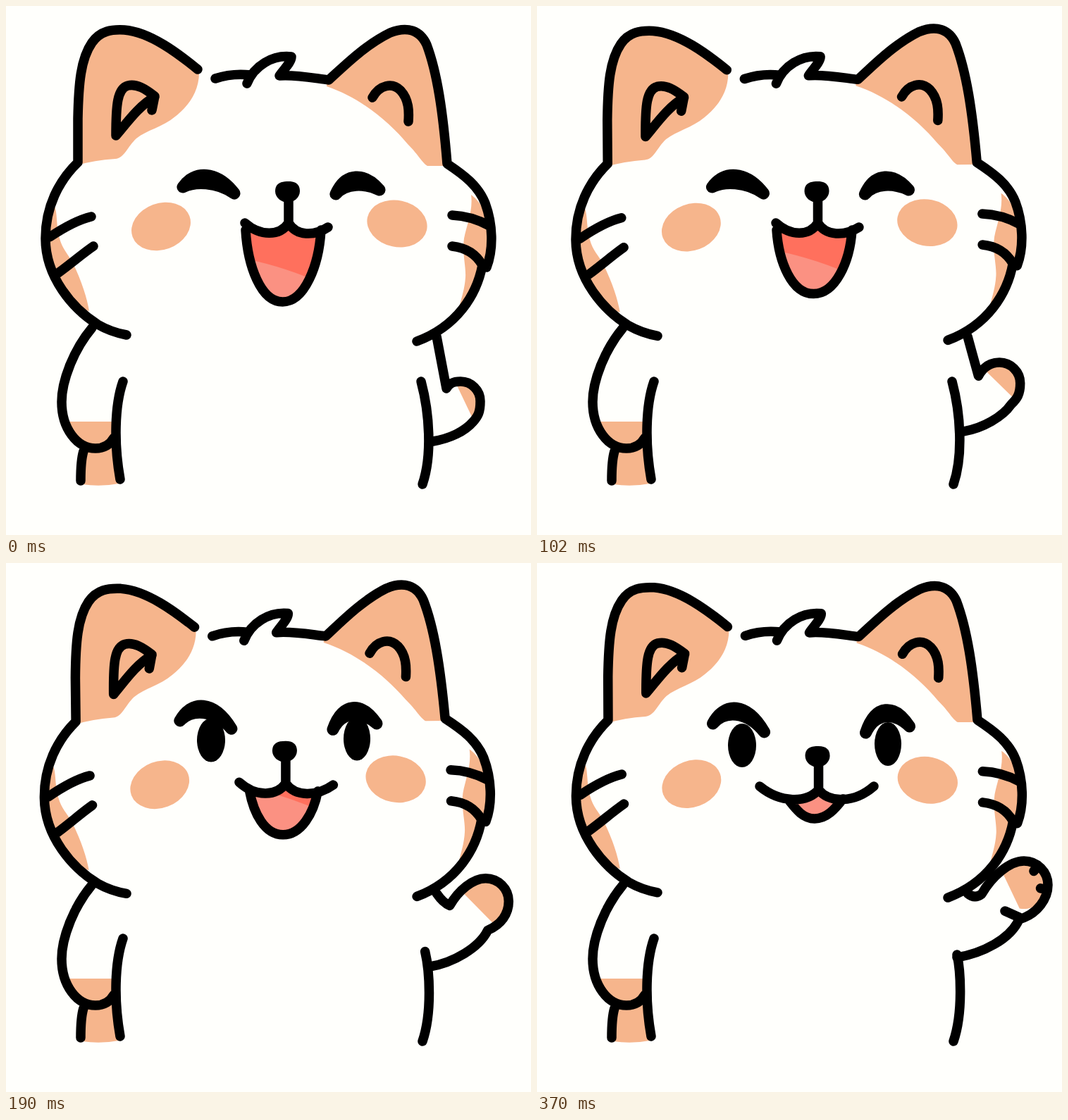
Write an HTML page that moves like this. It is 745 px wide and 751 px high and loops after 430 ms.

```html
<!DOCTYPE html>
<html lang="en">
<head>
<meta charset="utf-8">
<title>Waving cat</title>
<style>
  html, body { margin: 0; width: 100%; height: 100%; overflow: hidden; background: #fffffc; }
  svg { display: block; width: 100%; height: 100%; }
  .line { fill: none; stroke: #000; stroke-width: 13.5; stroke-linecap: round; stroke-linejoin: round; }
  .fur { fill: #f6b58c; }
  .brow { stroke: #000; stroke-width: 17; stroke-linejoin: round; }
</style>
</head>
<body>
<svg viewBox="0 0 745 751">
  <clipPath id="inside"><path id="clip"/></clipPath>

  <!-- body -->
  <path class="fur" d="M90 590H153V612C145 634 102 632 90 590ZM111 632L155 627L160 678Q134 683 108 679Z"/>
  <path class="line" d="M122 457C96 488 79 532 79 562C79 600 101 628 127 628C140 628 148 622 153 613M166 533C154 567 153 622 162 672M110 632C106 645 106 660 106 674"/>
  <path class="line" id="side"/>

  <!-- waving arm -->
  <path class="fur" id="pad"/>
  <path class="line" id="arm"/>

  <!-- head -->
  <g id="head">
    <path class="fur" d="M101 222V160C102 110 104 75 120 52C133 35 150 33 168 34C205 37 245 68 274 92C275 125 254 146 240 157C222 172 200 176 185 188C172 200 168 216 155 217Q125 219 101 226Z"/>
    <path class="fur" d="M455 108C480 85 510 55 545 38C570 28 588 35 597 55C612 95 620 150 626 227L598 227C590 222 586 212 570 196C545 166 505 131 455 114Z"/>
    <path class="fur" d="M69 285C73 292 71 312 76 330C80 345 88 352 95 365C108 392 115 415 118 433C98 428 60 380 57 330ZM660 268C663 290 654 310 650 330C647 350 653 370 652 385C651 402 646 415 643 428C665 405 676 380 678 368L686 330C688 300 674 278 660 268Z"/>
    <ellipse class="fur" rx="43" ry="33" transform="translate(220 313)rotate(-20)"/>
    <ellipse class="fur" rx="43" ry="33" transform="translate(555 309)rotate(12)"/>
    <path class="line" d="M272 90C245 68 205 37 168 34C150 33 134 35 122 52C106 75 103 110 102 160V222C75 248 56 285 56 330C56 385 95 430 130 452Q149 463 171 467"/>
    <path class="line" d="M297 103C312 98 330 96 347 98M342 110C352 85 378 69 405 72C405 80 394 90 388 99C410 97 440 103 458 105C480 85 510 55 545 38C570 28 588 35 597 55C612 95 620 150 626 224C650 240 670 255 680 280C691 310 692 345 682 371"/>
    <path class="line" d="M583 476C640 455 668 410 676 368C667 352 652 343 633 341M633 297Q660 298 686 312M62 328C80 316 100 304 121 299M74 379C92 366 108 352 124 341"/>
    <path class="line" d="M207 148L211 128C198 118 186 110 173 113C158 117 156 140 156 184C170 168 188 142 211 129M520 130C530 112 548 108 560 120C572 133 572 150 571 164"/>
  </g>

  <!-- face -->
  <g id="eyes">
    <ellipse cx="291" rx="20" ry="31"/>
    <ellipse cx="498" cy="-2" rx="19" ry="31"/>
  </g>
  <path class="brow" id="browL"/>
  <path class="brow" id="browR"/>
  <path id="mouth" fill="#ff705d"/>
  <path id="tongue" fill="#fb9182" clip-path="url(#inside)"/>
  <path class="line" id="lips"/>
  <path id="nose" d="M-17 -1C-17 -13 -8 -15 2 -15C13 -15 18 -10 18 -1C18 8 9 15 1 15C-8 15 -17 8 -17 -1Z"/>
</svg>
<script>
const $ = id => document.getElementById(id);
const set = (id, name, value) => $(id).setAttribute(name, value);
const clamp = x => Math.min(1, Math.max(0, x));
const smooth = x => x * x * (3 - 2 * x);
const polar = (x, y, r, a) => `${x + r * Math.cos(a)} ${y + r * Math.sin(a)}`;

function brow(x1, y1, x2, y2, up, low) {
  const a = x1 + (x2 - x1) * .22, b = x1 + (x2 - x1) * .66, y = (y1 + y2) / 2;
  return `M${x1} ${y1}C${a} ${y - up} ${b} ${y - up} ${x2} ${y2}C${b} ${y - low} ${a} ${y - low} ${x1} ${y1}Z`;
}

// open: 0 laughing with shut eyes, 1 brows fully raised
function drawEyes(step, open, sway) {
  const y = 257 - 41 * open + 6 * Math.max(0, step - 4);
  const slope = 9 + 3 * open, up = 28 + 9 * open, low = 13 + 12 * open;
  set('browL', 'd', brow(249 + sway, y, 322 + sway, y + slope, up, low));
  set('browR', 'd', brow(466 + sway, y + slope + 1, 528 + sway, y + 4, up, low));
  set('eyes', 'transform', `translate(0 ${244 + 2.5 * step})`);
  set('eyes', 'visibility', open ? 'visible' : 'hidden');
}

// smile: 0 wide open mouth, 1 small mouth with long lips
function drawMouth(step, smile, sway) {
  const noseX = 397 + sway, noseY = 264 + 11 * smile;
  const cx = noseX + 2, cy = 308 + 14 * smile, dip = 327 + 14 * smile;
  const lx = 339 - 23 * smile, rx = 457 + 21 * smile, lw = cx - lx, rw = rx - cx;
  const jl = 340 + 16 * smile, jr = 447 - 13 * smile, mid = (jl + jr) / 2 - 1;
  const top = 318 + 17 * smile, low = 420 - 57 * clamp(step / 5);
  const bend = (top + low) / 2, edge = 3 + 8 * smile, round = 31 - 14 * smile;
  const lip = `M${lx} ${308 + 9 * smile}C${lx + lw * .35} ${dip} ${cx - lw * .2} ${dip} ${cx} ${cy}` +
    `C${cx + rw * .2} ${dip} ${rx - rw * .35} ${dip} ${rx} ${314 + 3 * smile}`;
  const jaw = `${jr} ${top}C${jr - edge} ${bend} ${mid + round} ${low} ${mid} ${low}` +
    `C${mid - round} ${low} ${jl + edge} ${bend} ${jl} ${top}`;
  const pink = low - 63 - 20 * smile;
  set('nose', 'transform', `translate(${noseX} ${noseY})`);
  set('mouth', 'd', `${lip}L${jaw}Z`);
  set('clip', 'd', `${lip}L${jaw}Z`);
  set('lips', 'd', `${lip}M${cx} ${noseY + 10}V${cy}M${jaw}`);
  set('tongue', 'd', `M330 ${pink}Q395 ${pink + 12} 455 ${pink + 40}V430H330Z`);
}

// raise: 0 paw low at the side, 1 paw up
function drawArm(raise) {
  const r2 = raise * raise;
  const px = 645 + 46 * raise, py = 561 - 104 * raise, R = 28 + 6 * raise, k = R * .55;
  const crookX = 625 + 6 * raise, crookY = 543 - 73 * raise;
  const wristX = px + 18 - 25 * r2, wristY = py + 29 + 20 * r2;
  const rootX = 606 - 10 * raise ** 3, rootY = 618 - 58 * raise;
  let d = `M611 469Q${(611 + crookX) / 2} ${(469 + crookY) / 2 + 8 * r2} ${crookX} ${crookY}` +
    `C${crookX + 3 + 12 * raise} ${crookY - 6 - 20 * raise} ${px - 12 - 8 * raise} ${py - R} ${px} ${py - R}` +
    `C${px + k} ${py - R} ${px + R} ${py - k} ${px + R} ${py}` +
    `C${px + R} ${py + k} ${wristX + 7 + 20 * r2} ${wristY - 8} ${wristX} ${wristY}` +
    `C${wristX - 12} ${wristY + 14 + 14 * raise} ${rootX + 24 + 12 * raise} ${rootY - 4 - 2 * raise} ${rootX} ${rootY}`;
  if (raise > .9) { // toes and wrist crease
    for (const a of [-.95, .2]) d += `M${polar(px, py, R, a)}L${polar(px, py, R - 10, a)}`;
    d += `M${wristX} ${wristY - 3}l-20 -9`;
  }
  set('arm', 'd', d);

  // the coloured tip is a circle segment whose chord turns and slides back
  const facing = (37 + 110 * (raise - .5) ** 2 - 90) * Math.PI / 180;
  const half = Math.acos((5 - 25 * raise) / R);
  set('pad', 'd', `M${polar(px, py, R, facing - half)}A${R} ${R} 0 ${+(half > Math.PI / 2)} 1 ${polar(px, py, R, facing + half)}Z`);
}

function draw(step) {
  const tilt = -.68 * Math.sin(Math.PI * (step / 7) ** .8), sway = 2 + 6 * tilt;
  const open = 1 - (1 - clamp((step - 1) / 3)) ** 1.5;
  set('head', 'transform', `rotate(${tilt} 365 465)`);
  set('side', 'd', `M${589 + 7 * open} ${533 + 23 * open}C601 578 605 638 591 679`);
  drawEyes(step, open, sway);
  drawMouth(step, smooth(clamp((step - 1) / 5)), sway);
  drawArm(Math.sin(Math.PI / 2 * clamp(step / 5)) ** 1.2);
}

// Seven held poses of 60 ms; the second lasts 70 ms.
function tick() {
  const t = performance.now() % 430;
  draw(t < 60 ? 0 : Math.max(1, Math.floor((t - 10) / 60)));
  requestAnimationFrame(tick);
}
tick();
</script>
</body>
</html>
```
